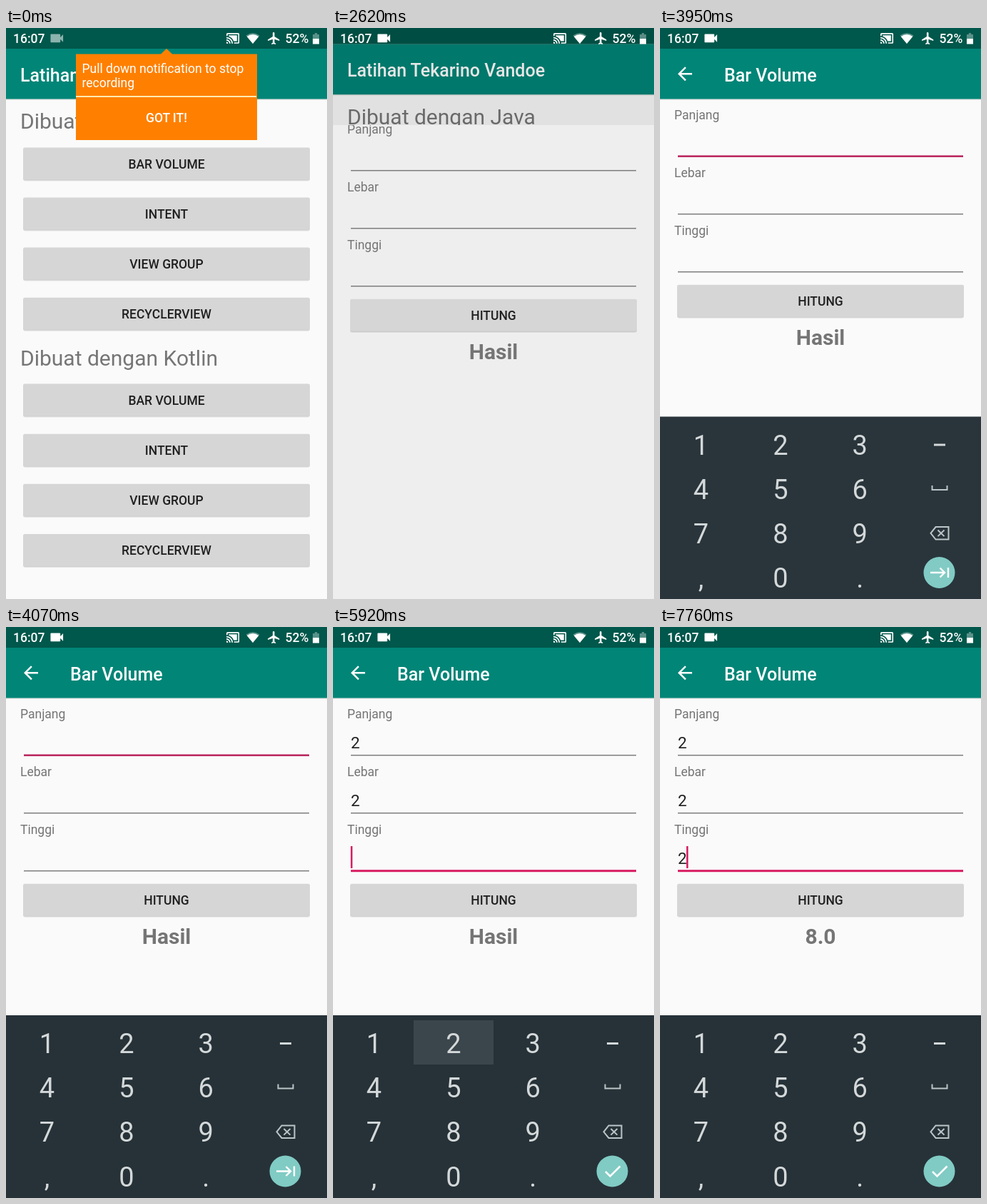
Animation of 450x800 px, one loop 8 s. Source, as an HTML page:

```html
<!DOCTYPE html>
<html lang="id">
<head>
<meta charset="utf-8">
<title>Bar Volume</title>
<style>
  html, body { margin: 0; width: 100%; height: 100%; overflow: hidden; background: #000; }
  svg { display: block; width: 450px; height: 800px; font-family: Roboto, sans-serif; }
  .title { font-size: 25px; font-weight: 500; fill: #fff; }
  .heading { font-size: 30px; fill: #757575; }
  .button { font-size: 17.5px; font-weight: 500; fill: #202020; text-anchor: middle; }
  .label { font-size: 17.5px; fill: #757575; }
  .value { font-size: 22.5px; fill: #212121; }
  .result { font-size: 30px; font-weight: 700; fill: #757575; text-anchor: middle; }
  .status { font-size: 17.5px; font-weight: 500; fill: #fff; }
  .key { font-size: 38px; fill: #d4d8d9; text-anchor: middle; }
  .tip { font-size: 17.5px; fill: #fff; }
</style>
</head>
<body>
<svg id="stage" viewBox="0 0 450 800"></svg>
<script>
const LOOP = 8000;
const PINK = '#d81b60', GREY = '#7c7c7c';
const FIELD_PITCH = 81;

const rect = (x, y, w, h, fill, extra = '') =>
  `<rect x="${x}" y="${y}" width="${w}" height="${h}" fill="${fill}" ${extra}/>`;
const text = (x, y, cls, str, extra = '') =>
  `<text x="${x}" y="${y}" class="${cls}" ${extra}>${str}</text>`;
const icon = (x, y, scale, d, extra = '') =>
  `<path transform="translate(${x} ${y}) scale(${scale})" d="${d}" fill="#fff" ${extra}/>`;
const stroke = (d, color, width, extra = '') =>
  `<path d="${d}" fill="none" stroke="${color}" stroke-width="${width}" ${extra}/>`;

// A raised button; a named one also gets a clipped ripple.
function button(y, label, id) {
  const ripple = id ? `
    <clipPath id="${id}Clip">${rect(24, y, 402, 45, '#000', 'rx="2.5"')}</clipPath>
    <circle id="${id}" cx="225" cy="${y + 22.5}" r="0" clip-path="url(#${id}Clip)"/>` : '';
  return rect(24, y + 1, 402, 46, '#000', 'rx="3" opacity=".09"') +
    rect(24, y + 0.5, 402, 45.5, '#000', 'rx="3" opacity=".09"') +
    rect(24, y, 402, 45, '#d6d6d6', 'rx="2.5"') + ripple +
    text(225, y + 29.2, 'button', label);
}

const appBar = content =>
  rect(0, 99, 450, 2, '#000', 'opacity=".08"') +
  rect(0, 0, 450, 29, '#00574b') + rect(0, 29, 450, 70.5, '#008577') + content;

function buttonList(y, language, rippleId) {
  const labels = ['BAR VOLUME', 'INTENT', 'VIEW GROUP', 'RECYCLERVIEW'];
  return text(20, y, 'heading', 'Dibuat dengan ' + language) +
    labels.map((s, i) => button(y + 26 + i * 70.1, s, i ? '' : rippleId)).join('');
}

const menuPage = () =>
  rect(0, 0, 450, 820, '#fafafa') +
  appBar(text(20, 74.5, 'title', 'Latihan Tekarino Vandoe')) +
  buttonList(141.4, 'Java', '') + buttonList(472.6, 'Kotlin', 'menuRipple');

const field = (label, i) =>
  text(20, 128 + i * FIELD_PITCH, 'label', label) +
  text(25, 170 + i * FIELD_PITCH, 'value', '', `id="value${i}"`) +
  rect(25, 0, 400, 0, GREY, `id="line${i}"`);

const formPage = () =>
  rect(0, 0, 450, 800, '#fafafa', 'id="formBack"') +
  appBar(icon(20, 49.3, 1.25, 'M20 11H7.83l5.59-5.59L12 4l-8 8 8 8 1.41-1.41L7.83 13H20z') +
    text(90, 74.5, 'title', 'Bar Volume')) +
  ['Panjang', 'Lebar', 'Tinggi'].map(field).join('') +
  rect(25, 0, 2.5, 31, PINK, 'id="caret"') +
  button(359.7, 'HITUNG', 'countRipple') +
  text(225, 443.5, 'result', 'Hasil', 'id="result"');

function keyboard() {
  const keys = ['1', '2', '3', '4', '5', '6', '7', '8', '9', ',', '0', '.'];
  const soft = '#bcc5c8';
  return rect(0, 544, 450, 290, '#263238') +
    rect(113, 551, 112, 62, '#3b464c', 'id="keyGlow"') +
    keys.map((k, i) =>
      text(57.5 + (i % 3) * 111.4, 597 + Math.floor(i / 3) * 62.2, 'key', k)).join('') +
    rect(384, 582, 16, 3, '#d4d8d9') +
    stroke('M381.5 640.5v6h21v-6', soft, 2) +
    stroke('M386.5 698.5h18v17.5h-18l-7-8.7zM389.5 703l9 8.6m0-8.6l-9 8.6', soft, 2) +
    '<circle id="action" cx="391.5" cy="762.5" r="22" fill="#80cbc4"/>' +
    stroke('M379 762.5h20m-6.5-6.5l6.5 6.5-6.5 6.5M404 755.5v14', '#fff', 2.4, 'id="next"') +
    stroke('M382 763l6.5 6.5 14-14', '#fff', 2.6, 'id="done"');
}

const statusBar = () =>
  text(10, 21, 'status', '16:07') +
  icon(59.5, 2.6, 0.98, 'M17 10.5V7c0-.55-.45-1-1-1H4c-.55 0-1 .45-1 1v10c0 .55.45 1 1 1h12c.55 0 1-.45 1-1v-3.5l4 4v-11z', 'id="camera"') +
  icon(308.2, 4.6, 0.82, 'M21 3H3c-1.1 0-2 .9-2 2v3h2V5h18v14h-7v2h7c1.1 0 2-.9 2-2V5c0-1.1-.9-2-2-2zM1 18v3h3c0-1.66-1.34-3-3-3zm0-4v2c2.76 0 5 2.24 5 5h2c0-3.87-3.13-7-7-7zm0-4v2c4.97 0 9 4.03 9 9h2c0-6.08-4.93-11-11-11zM19 7H5v1.63c3.96 1.28 7.09 4.41 8.37 8.37H19z') +
  icon(346, 22, 1, 'M0 0L-9.5-11.5Q0-18.5 9.5-11.5z', 'opacity=".35"') +
  icon(346, 22, 0.87, 'M0 0L-9.5-11.5Q0-18.5 9.5-11.5z') +
  icon(365.4, 4.3, 0.85, 'M21 16v-2l-8-5V3.5c0-.83-.67-1.5-1.5-1.5S10 2.67 10 3.5V9l-8 5v2l8-2.5V19l-2 1.5V22l3.5-1 3.5 1v-1.5L13 19v-5.5z') +
  text(391.5, 21, 'status', '52%') +
  icon(430, 7, 1, 'M0 2h2.8V0h3.4v2H9v6H0z', 'opacity=".35"') + rect(430, 15, 9, 7.5, '#fff');

const popup = () =>
  '<path d="M98 36.5H217L225 29l8 7.5H352V157H98z" fill="#ff8000"/>' +
  text(106.5, 62.5, 'tip', 'Pull down notification to stop') + text(106.5, 83, 'tip', 'recording') +
  rect(98, 95, 253, 2, '#ffeab0') +
  text(225, 132.3, 'tip', 'GOT IT!', 'text-anchor="middle" font-weight="500"');

const stage = document.getElementById('stage');
stage.innerHTML = `
  <clipPath id="reveal"><rect id="revealBox" width="450" height="840"/></clipPath>
  ${rect(0, 0, 450, 800, '#000')}
  <g id="menu">${menuPage()}</g>
  <g id="form" clip-path="url(#reveal)">${formPage()}</g>
  <g id="keyboard">${keyboard()}</g>
  <g>${statusBar()}</g>
  <g id="popup">${popup()}</g>`;

const el = {};
stage.querySelectorAll('[id]').forEach(node => el[node.id] = node);
const set = (id, attrs) => {
  for (const name in attrs) el[id].setAttribute(name, attrs[name]);
};
const show = (id, on) => set(id, { visibility: on ? 'visible' : 'hidden' });

const clamp = v => Math.min(1, Math.max(0, v));
const during = (t, spans) => spans.some(([from, to]) => t >= from && t < to);
const countPast = (t, times) => times.filter(time => t >= time).length;

// Holds time on an even grid of n steps inside a burst of changes.
function snap(t, from, to, n) {
  if (t < from || t >= to) return t;
  const step = (to - from) / (n - 1);
  return from + Math.floor((t - from) / step + 1e-6) * step;
}

// y at x on a cubic Bézier [x0, y0, ... x3, y3].
function bezier(x, [x0, y0, x1, y1, x2, y2, x3, y3]) {
  const at = (s, a, b, c, d) => {
    const r = 1 - s;
    return a * r ** 3 + 3 * b * s * r * r + 3 * c * s * s * r + d * s ** 3;
  };
  let low = 0, high = 1;
  for (let i = 0; i < 24; i++) {
    const mid = (low + high) / 2;
    if (at(mid, x0, x1, x2, x3) < x) low = mid; else high = mid;
  }
  return at(low, y0, y1, y2, y3);
}
const slide = x => bezier(x, [0, 0, .4, 0, .2, 1, 1, 1]);
const unveil = x => x < 1 / 6
  ? bezier(x, [0, 0, .05, 0, 2 / 15, .06, 1 / 6, .4])
  : bezier(x, [1 / 6, .4, 5 / 24, .82, .25, 1, 1, 1]);

function ripple(id, t, from, to) {
  const p = (snap(t, from, to, 6) - from) / (to - from);
  const on = t >= from && t < to;
  set(id, {
    r: on ? 40 + 190 * clamp(p * 1.6) : 0,
    opacity: on ? 0.12 * clamp((1.15 - p) * 2.2) : 0
  });
}

function drawPages(t) {
  const elapsed = snap(t, 2410, 3040, 10) - 2489;
  const x = clamp(elapsed / 425);
  const p = slide(x);
  show('form', x > 0);
  show('menu', x < 1);
  set('menu', {
    transform: `translate(0 ${-16 * p})`,
    opacity: 1 - 0.1 * clamp(elapsed / 117)
  });
  set('form', { transform: `translate(0 ${32.8 * (1 - p)})` });
  set('revealBox', { y: 767 * (1 - unveil(x)) });
  const shade = Math.round(230 + 20 * p);
  set('formBack', { fill: `rgb(${shade},${shade},${shade})` });
}

function drawFields(t) {
  const focus = countPast(t, [3490, 5040, 5850]) - 1;
  const typed = countPast(t, [4660, 5790, 6210]);
  const settling = t >= 3690 && t < 4140;
  for (let i = 0; i < 3; i++) {
    const focused = i === focus;
    const height = !focused ? 1.5 : settling ? 2.6 : 3;
    set('line' + i, {
      y: 179.7 + i * FIELD_PITCH - height / 2,
      height,
      fill: !focused ? GREY : t < 3690 ? '#6e6e6e' : settling ? '#bb2a60' : PINK
    });
    el['value' + i].textContent = i < typed ? '2' : '';
  }
  const caretSpans = [[4140, 4530], [4660, 4970], [5040, 5410], [5790, 6360], [6860, 7240], [7760, LOOP]];
  set('caret', { x: typed > focus ? 37 : 24.8, y: 145 + Math.max(0, focus) * FIELD_PITCH });
  show('caret', during(t, caretSpans));
  el.result.textContent = t < 6990 ? 'Hasil' : '8.0';
}

function drawKeyboard(t) {
  const rise = clamp((t - 3750) / 230);
  const eased = 1 - (1 - rise) ** 2;
  set('keyboard', { transform: `translate(0 ${32 * (1 - eased)})`, opacity: eased });
  show('keyGlow', during(t, [[4530, 4660], [5410, 5790], [5920, 6210]]));
  set('action', { fill: during(t, [[4970, 5040], [5850, 5920]]) ? '#94d3cd' : '#80cbc4' });
  show('next', t < 5850);
  show('done', t >= 5850);
}

function draw(t) {
  set('popup', { opacity: t < 60 ? 1 : t < 120 ? 0.4 : 0 });
  set('camera', { opacity: t < 780 ? 0.55 : t < 850 ? 0.8 : 1 });
  ripple('menuRipple', t, 1730, 2060);
  ripple('countRipple', t, 6800, 7100);
  drawPages(t);
  drawFields(t);
  drawKeyboard(t);
}

const start = performance.now();
function tick() {
  draw((performance.now() - start) % LOOP);
  requestAnimationFrame(tick);
}
tick();
</script>
</body>
</html>
```
